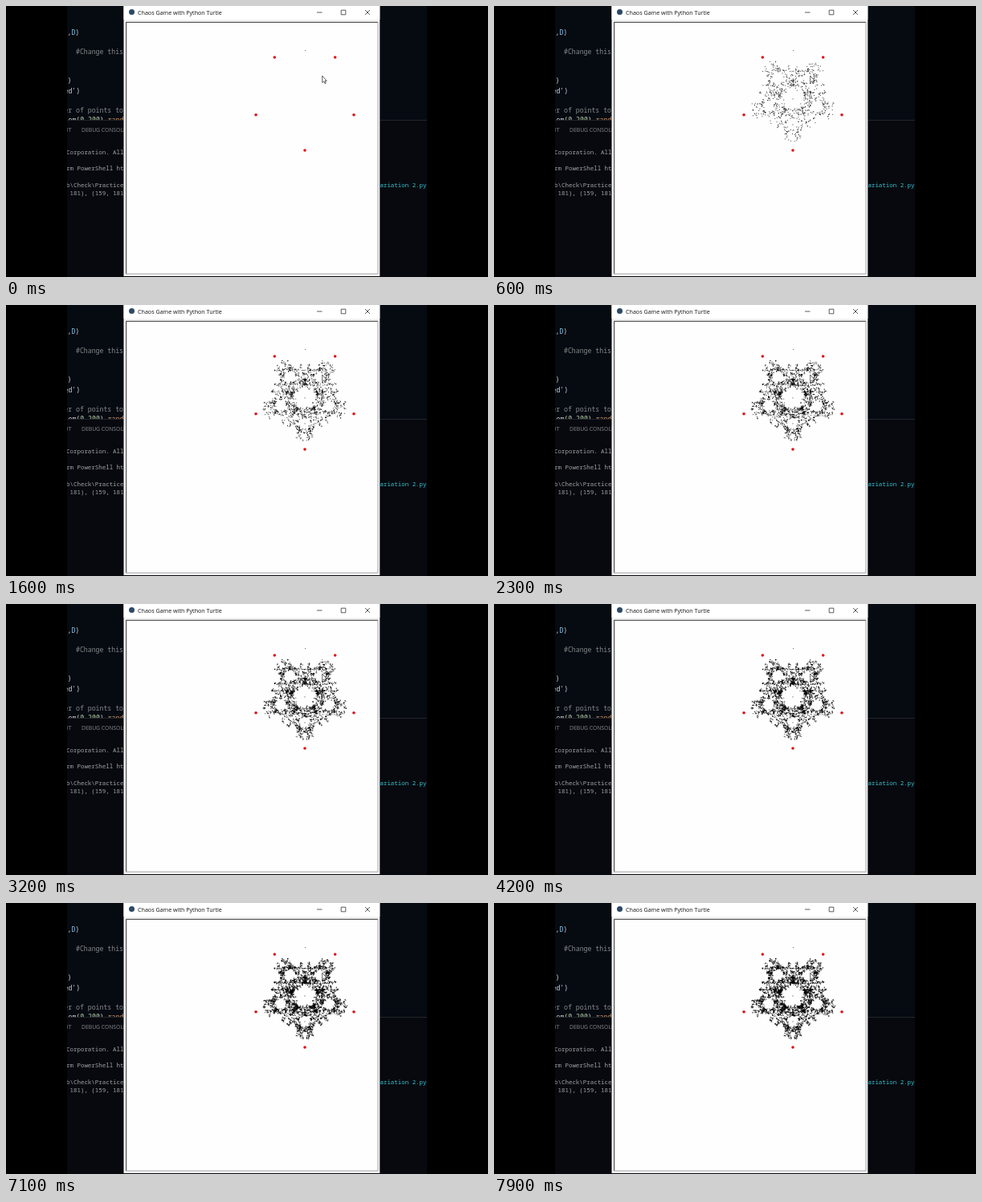
Recreate the animation shown at these times as an HTML page with a canvas. Size 600 by 338 pixels, loop 8 s.

```html
<!DOCTYPE html>
<html lang="en">
<head>
<meta charset="utf-8">
<title>Chaos Game</title>
<style>
  html, body { margin: 0; width: 600px; height: 338px; overflow: hidden; background: #000; }
  svg, canvas { position: absolute; left: 0; top: 0; display: block; }
  text { white-space: pre; }
  .code { font: 8.2px "Noto Sans Mono", "DejaVu Sans Mono", monospace; }
  .term { font: 7.45px "Noto Sans Mono", "DejaVu Sans Mono", monospace; fill: #a0a4a6; }
  .ui { font: 7.15px "Open Sans", "Noto Sans", sans-serif; }
  .tab { font-size: 6.8px; fill: #858a90; }
</style>
</head>
<body>
<svg width="600" height="338" viewBox="0 0 600 338">
  <defs>
    <clipPath id="editor"><rect x="76" y="0" width="448" height="142"/></clipPath>
    <clipPath id="panel"><rect x="76" y="142" width="448" height="196"/></clipPath>
  </defs>
  <rect width="600" height="338"/>
  <rect x="76" width="448" height="338" fill="#07090e"/>
  <g clip-path="url(#editor)" class="code">
    <rect x="76" width="448" height="142" fill="#060a11"/>
    <text x="76.5" y="36" fill="#d4d4d4">,<tspan fill="#8cc8ea">D</tspan>)</text>
    <text x="87" y="60" fill="#868b8d">#Change this</text>
    <text x="76.5" y="96" fill="#d4d4d4">)</text>
    <text x="72.5" y="108.5" fill="#c4dcea">ed')</text>
    <text x="146" y="132.5" text-anchor="end" fill="#868b8d">er of points to</text>
    <text x="77.5" y="145" fill="#d4d4d4">om(<tspan fill="#b5cea8">0</tspan>,<tspan fill="#b5cea8">200</tspan>)<tspan fill="#d09a70">,rand</tspan></text>
  </g>
  <g clip-path="url(#panel)">
    <path d="M76 142.5H524" stroke="#22262b"/>
    <text class="ui tab" x="81.5" y="156.5" text-anchor="end">OUTPUT</text>
    <text class="ui tab" x="94" y="156.5">DEBUG CONSOLE</text>
    <g class="term" text-anchor="end">
      <text x="146.5" y="184.5">Corporation. All</text>
      <text x="146.5" y="204.8">rm PowerShell ht</text>
      <text x="146.5" y="225.5">b\Check\Practice</text>
      <text x="146.5" y="235.7">181), (159, 181</text>
      <text x="523.5" y="225.5" fill="#38c4d2">ariation 2.py</text>
    </g>
  </g>
  <rect x="146.5" y="0" width="318.8" height="337" fill="#f3f3f3"/>
  <rect x="146.5" y="0" width="318.8" height="17" fill="#fff"/>
  <rect x="149" y="20" width="315" height="314.5" fill="#fefefe"/>
  <path d="M149.6 334V20.4H463" fill="none" stroke="#5c5c5c" stroke-width="1.3"/>
  <path d="M463 20V334H149" fill="none" stroke="#a4a4a8"/>
  <circle cx="156.5" cy="7.5" r="3.5" fill="#2b4a68"/>
  <text class="ui" x="164" y="10.6" fill="#151515">Chaos Game with Python Turtle</text>
  <path d="M387 8H393.5M417.2 5.2H422.8V10.8H417.2ZM447 5L453 11M453 5L447 11" fill="none" stroke="#333" stroke-width=".8"/>
</svg>
<canvas id="dots" width="600" height="338"></canvas>
<svg width="600" height="338" viewBox="0 0 600 338">
  <g id="corners" fill="#dc1018"></g>
  <path d="M393.7 87V95.6L395.7 93.8L397 96.8L398.2 96.2L397 93.4H399.2Z" fill="#fff" stroke="#222" stroke-width=".7"/>
</svg>
<script>
const LOOP = 8000, CX = 372, CY = 115.9, R = 64.1;

// [time, points drawn from then on]
const steps = [
  [0, 0], [300, 200], [400, 420], [500, 640], [600, 860], [800, 1080], [900, 1280], [1000, 1480],
  [1600, 1900], [2000, 2300], [2300, 2700], [2400, 2820], [3200, 3200],
  [3800, 3400], [3900, 3500], [4000, 3600], [4100, 3700], [4200, 3800], [4300, 3880],
  [5300, 4200], [5400, 4350], [6500, 4650], [6600, 4750],
  [6800, 4850], [6900, 4930], [7000, 5010], [7100, 5100], [7900, 5300]
];
const total = steps[steps.length - 1][1];

const corners = Array.from({ length: 5 }, (_, i) => {
  const a = Math.PI * (0.5 + 0.4 * i);
  return [CX + R * Math.cos(a), CY + R * Math.sin(a)];
});
document.getElementById("corners").innerHTML =
  corners.map(([x, y]) => `<circle cx="${x}" cy="${y}" r="1.8"/>`).join("");

function makeRandom(seed) {
  return () => {
    seed = (seed + 0x6D2B79F5) | 0;
    let t = Math.imul(seed ^ (seed >>> 15), 1 | seed);
    t = (t + Math.imul(t ^ (t >>> 7), 61 | t)) ^ t;
    return ((t ^ (t >>> 14)) >>> 0) / 4294967296;
  };
}

const adjacent = (a, b) => (a - b + 5) % 5 === 1 || (b - a + 5) % 5 === 1;

// Chaos game: go halfway to a random corner, never the one chosen two turns ago,
// and after a repeated corner never one of its neighbours.
function play(count) {
  const random = makeRandom(7), points = [];
  let x = CX, y = CY, last = 0, older = 1;
  const allowed = c => c !== older && !(last === older && adjacent(c, last));
  while (points.length < count) {
    points.push([x, y]);
    let next;
    do next = Math.floor(random() * 5); while (!allowed(next));
    x = (x + corners[next][0]) / 2;
    y = (y + corners[next][1]) / 2;
    older = last;
    last = next;
  }
  return points;
}

const points = play(total);
const ctx = document.getElementById("dots").getContext("2d");
let shown = -1;

function draw(time) {
  let count = 0;
  for (const [at, n] of steps) if (time >= at) count = n;
  if (count === shown) return;
  shown = count;
  ctx.clearRect(0, 0, 600, 338);
  ctx.fillStyle = "rgba(0,0,0,.6)";
  ctx.fillRect(372, 55, 1, 1);
  ctx.fillStyle = "rgba(0,0,0,.75)";
  for (let i = 0; i < count; i++) ctx.fillRect(points[i][0] - 0.5, points[i][1] - 0.5, 1, 1);
}

const start = performance.now();
function tick() {
  draw((performance.now() - start) % LOOP);
  requestAnimationFrame(tick);
}
tick();
</script>
</body>
</html>
```
